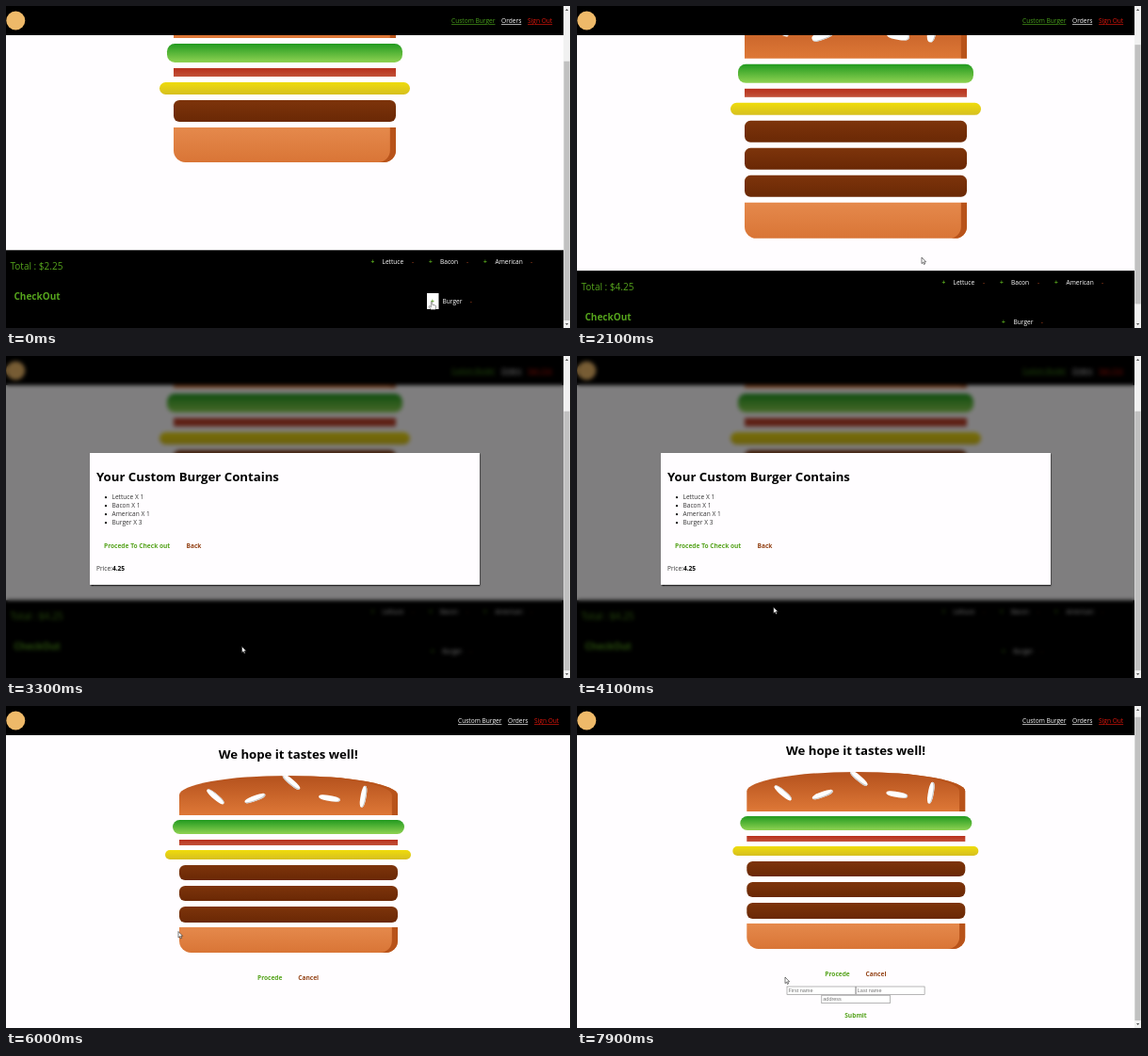
An HTML page that plays this animation: 600x342 px, repeating every 8000 ms.

```html
<!DOCTYPE html>
<html lang="en">
<head>
<meta charset="utf-8">
<title>Burger builder</title>
<style>
  html, body { margin: 0; width: 100%; height: 100%; overflow: hidden; background: #fffdff; }
  #stage { position: absolute; width: 600px; height: 342px; overflow: hidden; background: #fffdff; }
  #stage > *, .page > * { position: absolute; left: 0; top: 0; }
  svg { overflow: visible; width: 600px; height: 342px; }
  text { font: 6.6px "Open Sans", "Noto Sans", sans-serif; white-space: pre; }
  .b { font-weight: 700; }
  .h1 { font-size: 13.2px; font-weight: 700; }
  .big { font-size: 10px; }
  .mid { text-anchor: middle; }
  .green { fill: #55a31c; }
  .brown { fill: #944317; }
  .white { fill: #fff; }
  .u { text-decoration: underline; }
  .field rect { fill: #fff; stroke: #858585; stroke-width: .6; }
  .field text { font: 5.5px "Liberation Sans", Arial, sans-serif; fill: #757575; }

  /* burger */
  .burger { display: flow-root; }
  .burger div { margin: 2% auto; width: 80%; }
  .burger .bun { height: 20%; position: relative; overflow: hidden; border-radius: 50% 50% 0 0;
    background: linear-gradient(#b4511d, #de7837); box-shadow: inset -6.2px 0 #b8531a; }
  .burger .salad { width: 85%; height: 7%; border-radius: 8.25px; background: linear-gradient(#229a20, #8fd252); }
  .burger .bacon { height: 3%; background: linear-gradient(#b8301c, #c2523a); }
  .burger .cheese { width: 90%; height: 4.5%; border-radius: 8.25px; background: linear-gradient(#efdc0c, #d6bf20); }
  .burger .meat { height: 8%; border-radius: 6.2px; background: linear-gradient(#7d340b, #6a2805); }
  .burger .base { height: 13%; border-radius: 0 0 12.4px 12.4px;
    background: linear-gradient(#e5894c, #d97536); box-shadow: inset -6.2px 0 #b8531a; }
  .seed, .seed::before, .seed::after { position: absolute; background: #fff; border-radius: 40%; }
  .seed { width: 10%; height: 15%; top: 50%; box-shadow: inset -.8px -1.2px #c9c9c9; }
  .seed::before, .seed::after { width: 100%; height: 100%; }
  .s1 { left: 30%; transform: rotate(-20deg); }
  .s1::after { content: ""; left: -170%; top: -260%; transform: rotate(60deg); box-shadow: inset -.4px .8px #c9c9c9; }
  .s1::before { content: ""; left: 180%; top: -50%; transform: rotate(60deg); box-shadow: inset -.4px -1.2px #c9c9c9; }
  .s2 { left: 64%; transform: rotate(10deg); box-shadow: inset -1.2px 0 #c9c9c9; }
  .s2::before { content: ""; left: 150%; top: -130%; transform: rotate(90deg); box-shadow: inset .4px 1.2px #c9c9c9; }

  #build .burger { left: 148.5px; top: 33.1px; width: 295px; height: 290px; }
  #check .burger { left: 155px; top: 68.6px; width: 289.5px; height: 206px; }
  #veil { width: 592px; height: 342px; background: rgba(0, 0, 0, .5); backdrop-filter: blur(2px); }
  #stage > #modal { left: 89px; top: 102.5px; width: 414px; height: 140px; background: #fffdff; box-shadow: .5px 1px 1.5px #000; }
  #modal svg { position: absolute; left: -89px; top: -102.5px; }
</style>
</head>
<body>
<div id="stage">
  <div id="build" class="page">
    <div class="burger"></div>
    <svg>
      <rect y="322.3" width="592" height="83"/>
      <text id="total" class="big green" x="4.5" y="343"></text>
      <rect id="outHover" x="4" y="360" width="57" height="22" fill="#fff"/>
      <text class="big b green" x="8.5" y="375">CheckOut</text>
      <rect id="plusHover" x="447" y="368" width="12.5" height="17" fill="#fff"/>
      <g id="controls"></g>
    </svg>
  </div>

  <div id="check" class="page">
    <div class="burger"></div>
    <svg>
      <text class="h1 mid" x="299.7" y="55.7">We hope it tastes well!</text>
      <text class="b green" x="267" y="290.7">Procede</text>
      <text class="b brown" x="310.3" y="290.7">Cancel</text>
      <g id="form"></g>
    </svg>
  </div>

  <svg id="head">
    <rect id="bar" height="31"/>
    <circle cx="10.3" cy="15.5" r="10" fill="#eeb969"/>
    <g id="nav">
      <text id="custom" class="u" x="473" y="18">Custom Burger</text>
      <text class="u white" x="526" y="18">Orders</text>
      <text class="u" x="554" y="18" fill="#e0160c">Sign Out</text>
    </g>
  </svg>

  <div id="veil"></div>
  <div id="modal">
    <svg>
      <text class="h1" x="96" y="132.7">Your Custom Burger Contains</text>
      <g id="list" fill="#333"></g>
      <text class="b green" x="104" y="203.5">Procede To Check out</text>
      <text class="b brown" x="191.5" y="203.5">Back</text>
      <text x="96" y="227.5" fill="#333">Price:<tspan class="b" fill="#000">4.25</tspan></text>
    </svg>
  </div>

  <svg id="scroll">
    <rect x="592" width="7" height="342" fill="#f1f1f1"/>
    <rect id="thumb" x="592.4" width="6.2" fill="#c1c1c1"/>
    <path d="M594 5l1.6-2 1.6 2zM594 337l1.6 2 1.6-2z" fill="#505050"/>
  </svg>
  <svg>
    <rect x="599" width="1" height="342" fill="#111"/>
    <g id="cursor" stroke-linejoin="round">
      <path id="arrow" d="M0 0v6.6l1.5-1.4 1 2.3 1.1-.5-1-2.2h2z" fill="#fff" stroke="#222" stroke-width=".6"/>
      <path id="hand" d="M-.6.3q.7-.8 1.4 0v3l3 .7q.9.3.8 1.3l-.6 3.2H-.8L-3 5.200q.4-1 1.300-.3l1.100.9z" fill="#fff" stroke="#555" stroke-width=".6"/>
    </g>
  </svg>
</div>

<script>
const $ = id => document.getElementById(id);
const show = (el, on) => el.style.display = on ? '' : 'none';
const clamp = v => Math.max(0, Math.min(1, v));
const smooth = v => v * v * (3 - 2 * v);
const ramp = (t, from, to) => smooth(clamp((t - from) / (to - from)));

const layers = 'bun salad bacon cheese meat meat meat base'.split(' ');
for (const el of document.querySelectorAll('.burger'))
  el.innerHTML = layers.map(c => `<div class="${c}">${
    c == 'bun' ? '<i class="seed s1"></i><i class="seed s2"></i>' : ''}</div>`).join('');

// name, plus x, label x, minus x, baseline
$('controls').innerHTML = [
  ['Lettuce', 389.5, 399.5, 432, 337.4],
  ['Bacon', 451, 461, 490, 337.4],
  ['American', 509, 519.5, 558, 337.4],
  ['Burger', 453, 463.5, 493.7, 379]
].map(([name, plus, x, minus, y]) =>
  `<text class="b mid green" x="${plus}" y="${y}">+</text>
   <text class="white" x="${x}" y="${y}">${name}</text>
   <text class="b mid" x="${minus}" y="${y}" fill="#6b2a12">-</text>`).join('');

$('list').innerHTML = ['Lettuce X 1', 'Bacon X 1', 'American X 1', 'Burger X 3'].map((s, i) =>
  `<circle cx="106" cy="${150.2 + 9 * i}" r="1.1" fill="#000"/>
   <text x="112.5" y="${152.4 + 9 * i}">${s}</text>`).join('');

$('form').innerHTML = [['First name', 226.7, 302], ['Last name', 300, 302], ['address', 263.5, 311.2]]
  .map(([s, x, y]) => `<g class="field"><rect x="${x}" y="${y}" width="72.8" height="8.500"/>
    <text x="${x + 1.5}" y="${y + 6.2}">${s}</text></g>`).join('') +
  '<text class="b mid green" x="299.7" y="335">Submit</text>';

const patties = document.querySelectorAll('#build .meat');

// time, x, y of the pointer tip
const path = [
  [0, 452, 314], [700, 452, 314], [1050, 366, 267], [2150, 366, 267], [2750, 31, 308],
  [2980, 31, 308], [3280, 250.5, 308.5], [3800, 250.5, 308.5], [4500, 145, 203],
  [5400, 145, 203], [5850, 183, 239.5], [6050, 183, 239.5], [6500, 280, 286],
  [6900, 280, 286], [7500, 221, 288], [8000, 221, 288]
];

function pointer(t) {
  const i = path.findIndex(p => p[0] > t);
  const [t0, x0, y0] = path[i - 1], [t1, x1, y1] = path[i];
  const k = ramp(t, t0, t1);
  return [x0 + (x1 - x0) * k, y0 + (y1 - y0) * k];
}

function render(t) {
  const checkout = t >= 5200, modal = t >= 2960 && !checkout, form = t >= 6800;
  const bars = !checkout || form;
  const added = (t >= 250) + (t >= 550);
  const scroll = checkout
    ? 4 * ramp(t, 7200, 7400)
    : 63 * (1 - ramp(t, 980, 1180) + ramp(t, 1950, 2200));

  show($('build'), !checkout);
  show($('check'), checkout);
  $('build').style.transform = `translateY(${-scroll}px)`;
  $('check').style.transform = `translate(${form ? -3.7 : 0}px, ${-scroll}px)`;
  patties.forEach((p, i) => show(p, i <= added));
  $('total').textContent = `Total : $${2 + added}.25`;
  show($('plusHover'), t < 760);
  show($('outHover'), t >= 2640 && t < 2960);
  show($('form'), form);

  $('bar').setAttribute('width', bars ? 592 : 599);
  $('nav').setAttribute('transform', `translate(${bars ? 0 : 7})`);
  $('custom').setAttribute('fill', checkout ? '#fff' : '#4ba31c');

  show($('veil'), modal);
  show($('modal'), modal);
  const drop = 1 - (1 - clamp((t - 2960) / 300)) ** 2;
  $('modal').style.transform = `translateY(${342 * (drop - 1)}px)`;
  $('modal').style.opacity = drop;

  show($('scroll'), bars);
  const ratio = 326 / (checkout ? 346 : 405);
  $('thumb').setAttribute('y', 8 + scroll * ratio);
  $('thumb').setAttribute('height', 342 * ratio);

  const [x, y] = pointer(t);
  $('cursor').setAttribute('transform', `translate(${x} ${y})`);
  const hand = t < 760 || t >= 2640 && t < 3020 || t >= 4380 && t < 5200 || t >= 6440 && t < 7050;
  show($('hand'), hand);
  show($('arrow'), !hand);
}

const start = performance.now();
function tick() {
  render((performance.now() - start) % 8000);
  requestAnimationFrame(tick);
}
tick();
</script>
</body>
</html>
```
